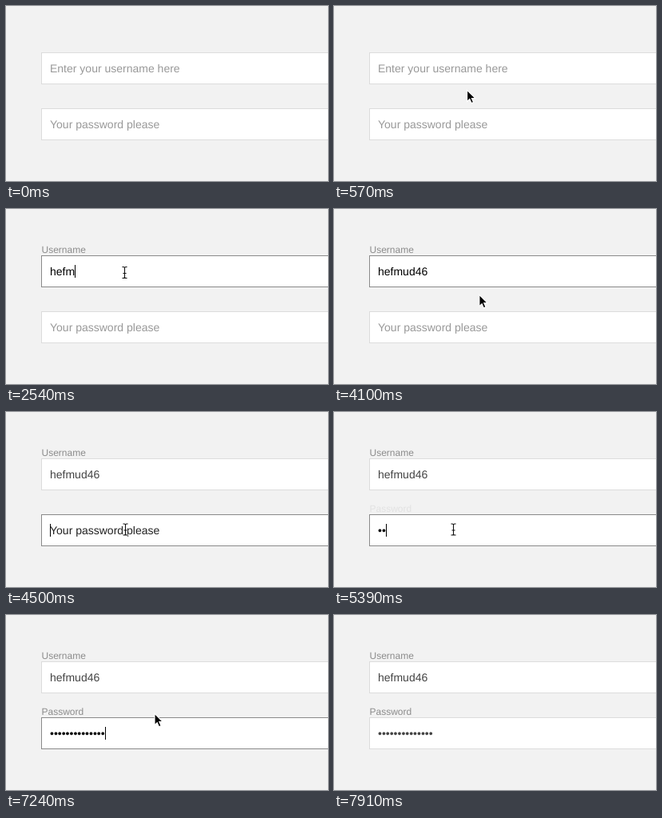
Animation of 403x219 px, one loop 7950 ms. Source, as an HTML page:

```html
<!DOCTYPE html>
<html lang="en">
<head>
<meta charset="utf-8">
<title>Floating labels</title>
<style>
  html, body { margin: 0; width: 100%; height: 100%; overflow: hidden; background: #f2f2f2; }
  svg { display: block; width: 403px; height: 219px; }
  text { font-family: "Liberation Sans", Helvetica, Arial, sans-serif; font-size: 14px; text-rendering: geometricPrecision; }
  .label { font-size: 12px; fill: #8c8c8c; }
</style>
</head>
<body>
<svg id="stage" viewBox="0 0 403 219">
  <rect width="403" height="219" fill="#f2f2f2"/>
  <g id="fields"></g>
  <g id="arrow">
    <path d="M0 0V14.2L3.2 11.2L5.4 16.3L8 15.2L5.8 10.2H10.2Z" fill="#000" stroke="#fff" stroke-width="1.1"/>
  </g>
  <g id="beam" fill="none" stroke-linecap="square">
    <path id="halo" stroke="#fff" stroke-width="2.4" stroke-opacity=".7"/>
    <path id="bar" stroke="#111" stroke-width="1.1"/>
  </g>
</svg>
<script>
const LOOP = 7950;
const LEFT = 44, HEIGHT = 40, TEXT_X = 55;
const $ = id => document.getElementById(id);

function add(parent, tag, attrs) {
  const el = document.createElementNS('http://www.w3.org/2000/svg', tag);
  set(el, attrs);
  parent.appendChild(el);
  return el;
}

function set(el, attrs) {
  for (const key in attrs) el.setAttribute(key, attrs[key]);
}

const beamPath = 'M-2.5 -7H-1.5Q0 -7 0 -5.5Q0 -7 1.5 -7H2.5M0 -5.5V5.5' +
  'M-2.5 7H-1.5Q0 7 0 5.5Q0 7 1.5 7H2.5M-1.5 1H1.5';
set($('halo'), { d: beamPath });
set($('bar'), { d: beamPath });

const fields = [
  {
    y: 58, label: 'Username', hint: 'Enter your username here', value: 'hefmud46',
    focus: 1060, blur: 4500, labelAt: 1940, blink: 475,
    keys: [1800, 1980, 2270, 2540, 2660, 2810, 3250, 3430]
  },
  {
    y: 128, label: 'Password', hint: 'Your password please', value: '•'.repeat(14),
    focus: 4500, blur: 7910, labelAt: 5380, blink: 508,
    keys: [5240, 5360, 5470, 5620, 5800, 5980, 6050, 6120, 6270, 6420, 6570, 6610, 6650, 6950]
  }
];

for (const f of fields) {
  const g = $('fields');
  f.box = add(g, 'rect', { x: LEFT + .5, y: f.y + .5, width: 420, height: HEIGHT - 1, fill: '#fff' });
  f.title = add(g, 'text', { x: 44.5, y: f.y - 3, class: 'label' });
  f.title.textContent = f.label;
  f.text = add(g, 'text', { x: TEXT_X, y: f.y + 25 });
  f.caret = add(g, 'rect', { y: f.y + 12, width: 1, height: 16, fill: '#000' });
}

function drawField(f, t) {
  const typed = f.keys.filter(k => k <= t).length;
  const focused = t >= f.focus && t < f.blur;
  const last = typed ? f.keys[typed - 1] : f.focus;
  const ink = typed ? (focused ? '#000' : '#444') : (focused ? '#222' : '#999');

  f.text.textContent = typed ? f.value.slice(0, typed) : f.hint;
  set(f.text, { fill: ink });
  set(f.box, { stroke: focused ? '#8a8a8a' : '#dcdcdc' });
  set(f.title, { opacity: Math.min(1, Math.max(0, (t - f.labelAt) / 70)) });

  const width = typed ? f.text.getComputedTextLength() : 0;
  set(f.caret, {
    x: Math.round(TEXT_X + width),
    opacity: focused && t - last < f.blink ? 1 : 0
  });
}

// Pointer strokes: quadratic curves between rest positions
const REST_A = [148.5, 79.5], REST_B = [149.5, 147];
const easeOut = u => 1 - (1 - u) ** 2;
const strokes = [
  { from: 420, to: 760, path: [[188, 186], [182, 116], REST_A], ease: easeOut },
  { from: 4020, to: 4400, path: [REST_A, [219, 118], REST_B], ease: easeOut },
  { from: 7180, to: 7500, path: [REST_B, [240, 65], [386, 195]], ease: u => u }
];

function pointer(t) {
  if (t < strokes[0].from || t >= strokes[2].to) return null;
  const s = strokes.filter(m => m.from <= t).pop();
  const u = s.ease(Math.min(1, (t - s.from) / (s.to - s.from)));
  const [a, b, c] = s.path;
  return [0, 1].map(i => a[i] * (1 - u) ** 2 + 2 * b[i] * u * (1 - u) + c[i] * u * u);
}

function drawPointer(t) {
  const p = pointer(t);
  const inside = p && fields.some(f => p[1] >= f.y && p[1] < f.y + HEIGHT);
  const show = (el, on) => set(el, on
    ? { display: 'inline', transform: `translate(${p[0]} ${p[1]})` }
    : { display: 'none' });
  show($('beam'), p && inside);
  show($('arrow'), p && !inside);
}

function render(t) {
  fields.forEach(f => drawField(f, t));
  drawPointer(t);
}

const start = performance.now();
function tick() {
  render((performance.now() - start) % LOOP);
  requestAnimationFrame(tick);
}
tick();
</script>
</body>
</html>
```
